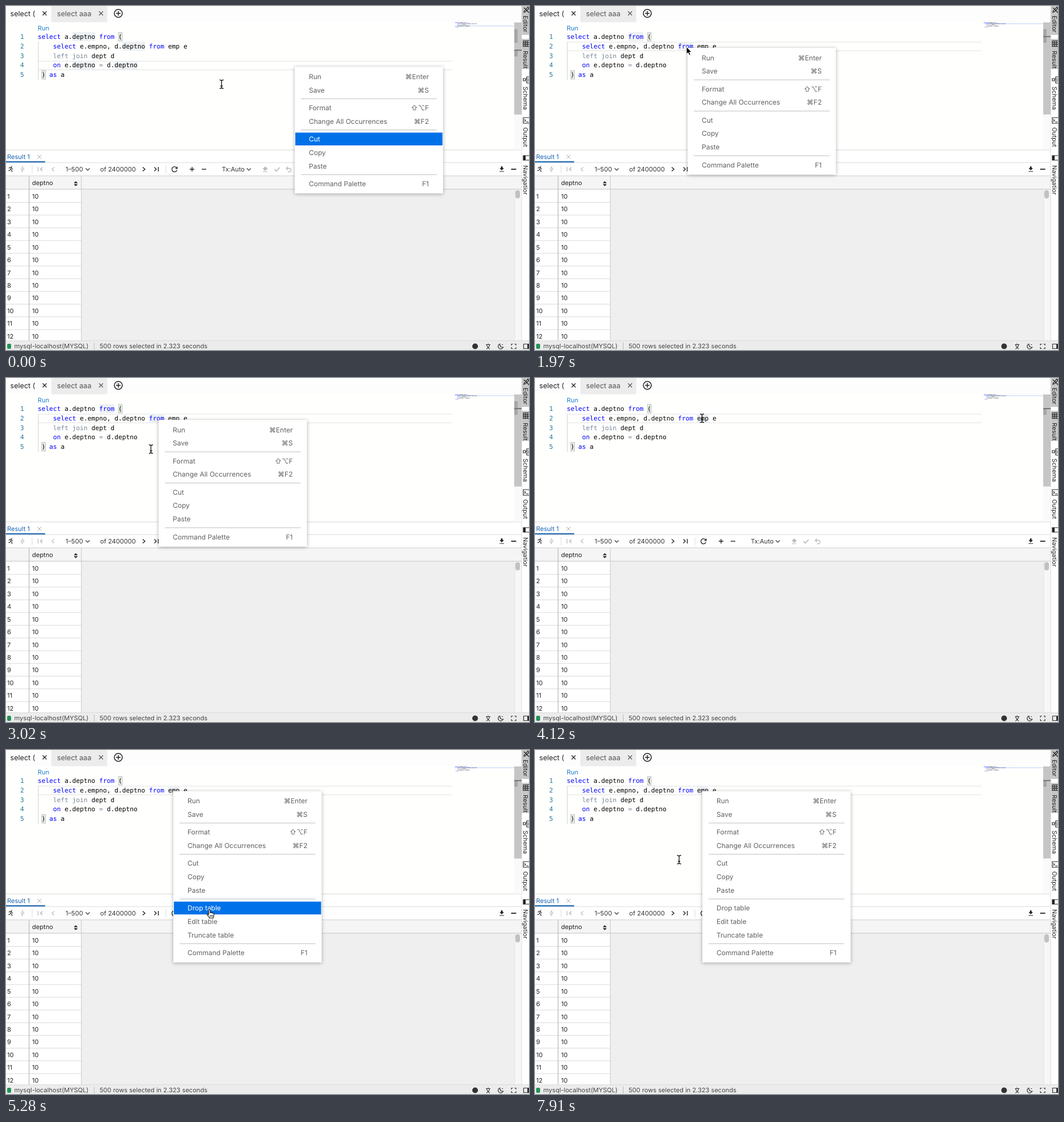
An HTML page that plays this animation: 922x607 px, repeating every 8000 ms.

```html
<!DOCTYPE html>
<html lang="en">
<head>
<meta charset="utf-8">
<title>SQL editor context menu</title>
<style>
html, body { margin: 0; width: 100%; height: 100%; overflow: hidden; background: #fff; }
svg { display: block; width: 922px; height: 607px; }
text { font-family: Inter, 'DejaVu Sans', sans-serif; font-size: 11.1px; fill: #333; white-space: pre; text-rendering: geometricPrecision; }
.code { font-family: 'DejaVu Sans Mono', monospace; font-size: 11.23px; }
.menu text { font-size: 12px; }
.panel { filter: drop-shadow(0 1px 3px rgba(0,0,0,.32)); }
</style>
</head>
<body>
<svg viewBox="0 0 922 607">
  <g id="back"></g><g id="marks"></g><g id="code"></g><g id="menu" class="menu"></g><g id="pointer"></g>
</svg>
<script>
const $ = id => document.getElementById(id);
const rect = (x, y, w, h, fill, extra = '') => `<rect x="${x}" y="${y}" width="${w}" height="${h}" fill="${fill}" ${extra}/>`;
const text = (x, y, s, fill = '#333', extra = '') => `<text x="${x}" y="${y}" style="fill:${fill}" ${extra}>${s}</text>`;
const icon = (x, y, d, color = '#333', width = 1.2, fill = 'none') =>
  `<path transform="translate(${x} ${y})" d="${d}" fill="${fill}" stroke="${color}" stroke-width="${width}"/>`;

const CROSS = 'M-3.5-3.5L3.5 3.5M3.5-3.5L-3.5 3.5';
const DOWN = 'M-3.5-1.5L0 2L3.5-1.5';
const CHAR = 6.76, LINE = 16.8, BLUE = '#0000ff', SLATE = '#778899';
const col = c => 56 + c * CHAR;
const lineTop = n => 46.2 + (n - 1) * LINE;

// line, column, text, colour
const TOKENS = [
  [1, 0, 'select', BLUE], [1, 7, 'a.deptno', '#000'], [1, 16, 'from', BLUE], [1, 21, '(', '#000'],
  [2, 4, 'select', BLUE], [2, 11, 'e.empno,', '#000'], [2, 20, 'd.deptno', '#000'], [2, 29, 'from', BLUE],
  [2, 34, 'emp', '#000'], [2, 38, 'e', '#000'],
  [3, 4, 'left', SLATE], [3, 9, 'join', SLATE], [3, 14, 'dept', '#000'], [3, 19, 'd', '#000'],
  [4, 4, 'on', BLUE], [4, 7, 'e.deptno', '#000'], [4, 16, '=', SLATE], [4, 18, 'd.deptno', '#000'],
  [5, 1, ')', '#000'], [5, 3, 'as', BLUE], [5, 6, 'a', '#000']
];

function tabs() {
  return rect(0, 0, 909, 28.5, '#fdfdfd') + rect(80, 0, 98.5, 28.5, '#ececec') +
    text(7.5, 17.5, 'select (', '#222', 'font-size="12.6" class="tab"') + text(90, 17.5, 'select aaa', '#555', 'class="tab"') +
    icon(68, 13, CROSS, '#222', 1.3) + icon(167.5, 13, CROSS, '#555') +
    icon(198, 13, 'M-7 0A7 7 0 1 1 7 0A7 7 0 1 1-7 0M-4 0H4M0-4V4', '#222', 1.5);
}

function resultBar() {
  const pale = '#bbb';
  const bars = [45.5, 281.5].map(x => rect(x, 281, 1, 14, '#ddd')).join('');
  return rect(0, 253.5, 909, 1, '#d6d6d6') + rect(0, 275.8, 909, 1, '#ddd') +
    text(2, 270, 'Result 1', '#1762b0') + icon(59, 266, CROSS, '#aaa', 1) + rect(0, 274, 69, 2, '#1762b0') + bars +
    icon(8, 288, 'M1.5-5.2H3M-3-1.5L-1-3.5H1.5L0 0L2.5 2V5M0 0L-1.5 2.5H-4M1.5-2.5L4-.5') +
    icon(29, 288, 'M1-5L-3 1H0L-1 5L3-1H0Z', pale, 1) +
    icon(60.5, 288, 'M-4-4V4M3.5-3.5L0 0L3.5 3.5M0 0H4', pale) + icon(83, 288, 'M2-3.5L-2 0L2 3.5', pale) +
    text(105, 292.3, '1–500') + icon(144, 288, DOWN) + text(166, 292, 'of 2400000') +
    icon(243, 288, 'M-2-3.5L2 0L-2 3.5', '#222', 1.4) + icon(265, 288, 'M-3.5-3.5L0 0L-3.5 3.5M3.5-4V4', '#222', 1.4) +
    icon(297, 288, 'M4.2-1.5A4.5 4.5 0 1 0 4.3 1.5M4.8-4.5V-1.2H1.5', '#222', 1.3) +
    icon(328, 288, 'M-4 0H4M0-4V4', '#222', 1.4) + icon(349, 288, 'M-4 0H4', '#222', 1.4) +
    text(380.5, 292.3, 'Tx:Auto') + icon(428, 288, DOWN) +
    icon(457, 288, 'M0-4.5L4-.5H1.5V2H-1.5V-.5H-4ZM-4 4.5H4', pale, 1, pale) +
    icon(478, 288, 'M-4.5 0L-1.5 3.5L4.5-3', pale, 1.8) + icon(498, 288, 'M-1-4.5L-4-1.5L-1 1.5M-4-1.5H1.5A3 3 0 0 1 1.5 4.5H-1', pale, 1.3) +
    icon(874, 287.5, 'M-1-4H1V-1H3L0 2L-3-1H-1ZM-4 4.5H4', '#222', 1, '#222') + icon(895, 288, 'M-4.5 0H4.5', '#222', 1.8);
}

function grid() {
  let out = rect(0, 299.5, 909, 291.5, '#efefef') + rect(0, 300, 909, 23, '#f5f5f5') + rect(0, 299.2, 909, 1, '#d2d2d2') +
    rect(0, 324, 133, 267, '#fff') + rect(0, 322.7, 909, 1, '#c6c6c6') +
    text(46, 316, 'deptno', '#222') + icon(123, 313.5, 'M-3-1.2H3L0-4ZM-3 1.2H3L0 4Z', '#222', .6, '#222');
  for (let i = 0; i < 12; i++) {
    const y = 324 + i * 22.45;
    out += text(2, y + 15.8, i + 1, '#222') + text(46, y + 15.8, '10', '#222') + rect(0, y + 22, 133, 1, '#dadada');
  }
  return out + rect(40, 300, 1.3, 291, '#bdbdbd') + rect(132.3, 300, 1, 291, '#c8c8c8') +
    rect(896.5, 324, 1, 267, '#e2e2e2') + rect(897.5, 324, 11.5, 267, '#f7f7f7') + rect(898, 325, 8, 14.5, '#c1c1c1', 'rx="4"');
}

function sidebar() {
  const names = [['Editor', 17], ['Result', 79], ['Schema', 142], ['Output', 214], ['Navigation', 281]];
  return rect(909, 0, 13, 591, '#fff') + rect(909, 0, 13, 51, '#c6c6c6') + rect(909, 58, 13, 53, '#c6c6c6') +
    rect(908.6, 0, 1, 591, '#ddd') +
    names.map(([s, y]) => text(0, 0, s, '#222', `transform="translate(912.3 ${y}) rotate(90)" class="side"`)).join('') +
    rect(910, 333, 12, 10, '#fff') +
    icon(917, 7, 'M-4 4L-3 1L3-5L5-3L-1 3ZM-4-4L5 5', '#222', 1.3) +
    icon(917, 66.5, 'M-5-5H6V5H-5ZM-5-1.7H6M-5 1.7H6M-1.5-5V5M2-5V5', '#222', 1.2) +
    icon(917, 130, 'M-5-2H-1V2H-5ZM1-5H6V-1H1ZM1 2H6V6H1ZM-1 0H1', '#222', 1.2) +
    icon(917, 202, 'M-5-5H6V5H-5ZM-3-2L-1 0L-3 2M0 2.5H4', '#222', 1.2) +
    icon(917, 268, 'M-5-4H6V4H-5Z', '#222', 1.2) + rect(912, 264, 4, 8, '#222');
}

function statusBar() {
  return rect(0, 590.5, 922, 16.5, '#ececec') + rect(0, 590, 922, 1, '#dcdcdc') +
    rect(2, 596, 7, 9, '#22935a', 'rx="2"') +
    text(14.5, 604.3, 'mysql-localhost(MYSQL)', '#444') + rect(155, 594, 1, 12, '#bbb') +
    text(165, 604.3, '500 rows selected in 2.323 seconds', '#444') +
    '<circle cx="827" cy="600.5" r="5" fill="#333"/>' +
    icon(850, 600.5, 'M-4-3H4M0-5V-3M-3 4.5Q2 2 2.5-3M3 4.5Q-2 2-2.5-3') +
    icon(872, 600.5, 'M-1-4.5A4.6 4.6 0 1 0 4.5 1.5A4.5 4.5 0 0 1-1-4.5M2-3H4') +
    icon(895, 600.5, 'M-4-1.5V-4H-1.5M1.5-4H4V-1.5M4 1.5V4H1.5M-1.5 4H-4V1.5') +
    icon(917, 600.5, 'M-4.5-4H5V4H-4.5Z') + rect(919, 596.5, 3, 8, '#333');
}

function codeLayer() {
  let out = text(56, 42.8, 'Run', '#1a7fd0') + rect(56.5, 63, 1, 67, '#d0d0d0');
  for (const [n, c] of [[1, 21], [5, 1]])
    out += rect(col(c) + .3, lineTop(n) + .4, 6.6, 15.2, '#e7f0e4', 'stroke="#b9b9b9" stroke-width=".9"');
  for (let n = 1; n <= 5; n++) out += text(25, lineTop(n) + 11.8, n, '#237893', 'class="code"');
  for (const [n, c, s, fill] of TOKENS)
    out += text(col(c), lineTop(n) + 11.8, s, fill, 'class="code"') +
      rect(791.5 + c, 28.8 + n * 2 - 2, s.length, 1.1, fill, 'opacity=".45"');
  return out;
}

function marksLayer(line, word) {
  const y = lineTop(line), rulerY = n => 41 + (n - 1) * 12;
  let out = rect(57, y + .2, 730, 1.2, '#e6e6e6') + rect(57, y + LINE - 1.4, 730, 1.2, '#e6e6e6') +
    rect(791, 28.2 + (line - 1) * 2, 105, 2, '#d9e6fb') +
    rect(896, 29, 13, 224.5, '#fafafa') + rect(896, 29, 13, 162.5, '#c5c5c5');
  for (const [n, c, s] of TOKENS) {
    const at = s.split('.').pop() === word ? s.length - word.length : -1;
    if (at >= 0)
      out += rect(col(c + at), lineTop(n), word.length * CHAR, LINE - 1, '#edf1f4') + rect(896, rulerY(n), 6, 12, '#a6a6a6');
  }
  return out + rect(896, rulerY(line), 13, 2, '#777');
}

const ROW = 23.75, GAP = 7.6, PAD = 5.3, MENU_W = 261.5;
const EDIT_ITEMS = [['Run', '⌘Enter'], ['Save', '⌘S'], 0, ['Format', '⇧⌥F'], ['Change All Occurrences', '⌘F2'], 0, ['Cut'], ['Copy'], ['Paste'], 0];
const TABLE_ITEMS = [['Drop table'], ['Edit table'], ['Truncate table'], 0];
const PALETTE = [['Command Palette', 'F1']];

function makeMenu(from, to, x, y, items) {
  let top = y + PAD;
  const rows = items.map(item => {
    const row = { item, top, height: item ? ROW : GAP };
    top += row.height;
    return row;
  });
  return { from, to, x, y, rows, bottom: top + PAD };
}
const MENUS = [
  makeMenu(0, 180, 509, 107.3, [...EDIT_ITEMS, ...PALETTE]),
  makeMenu(1880, 3200, 269, 74, [...EDIT_ITEMS, ...PALETTE]),
  makeMenu(4300, 8000, 295, 72.6, [...EDIT_ITEMS, ...TABLE_ITEMS, ...PALETTE])
];

function menuLayer(menu, active) {
  if (!menu) return '';
  const { x, y, rows, bottom } = menu;
  let out = rect(x, y, MENU_W, bottom - y, '#fff', 'class="panel"');
  for (const row of rows) {
    if (!row.item) { out += rect(x + 11, row.top + 2.9, 239.5, 1.2, '#c9c9c9'); continue; }
    const fill = row === active ? '#fff' : '#616161', base = row.top + 16.2;
    if (row === active) out += rect(x + 1, row.top + .6, MENU_W - 2, 22.6, '#0071e8');
    out += text(x + 25, base, row.item[0], fill) + text(x + 236.5, base, row.item[1] || '', fill, 'text-anchor="end"');
  }
  return out;
}

// start, end, steps, destination x, y
const MOVES = [
  [90, 830, 9, 225, 75], [920, 1180, 4, 232, 104], [1270, 1530, 4, 267, 72],
  [2090, 2360, 4, 320, 272], [2450, 2630, 3, 304, 175], [2720, 3020, 4, 255.5, 125.5],
  [3300, 3680, 5, 294.5, 71], [4470, 5190, 9, 352, 250], [5280, 5280, 1, 358.5, 281.5],
  [5370, 5370, 1, 361, 284], [5700, 5790, 2, 367, 306], [5990, 6170, 3, 374, 287.5], [7550, 7910, 5, 254, 193.5]
];
// start, current line, highlighted word
const CARETS = [[0, 4, 'deptno'], [1710, 2, ''], [1880, 2, 'from'], [3290, 5, ''], [3860, 2, ''], [4120, 2, 'emp']];

function pointerAt(t) {
  let x = 380, y = 138;
  for (const [start, end, steps, tx, ty] of MOVES) {
    if (t < start) break;
    const interval = steps > 1 ? (end - start) / (steps - 1) : 1;
    const p = Math.min(1, (Math.floor((t - start) / interval + 1e-6) + 1) / steps);
    x += (tx - x) * p;
    y += (ty - y) * p;
  }
  return [x, y];
}

const POINTERS = {
  beam: ['M-3.5-7.5Q0-7.5 0-5.5Q0-7.5 3.5-7.5M0-5.5V5.5M-3.5 7.5Q0 7.5 0 5.5Q0 7.5 3.5 7.5M-2 3H2', '#111', 1.3, 'none'],
  arrow: ['M0 0V13L3 10.3L5 15L7.2 14L5.2 9.5H9Z', '#fff', .9, '#000'],
  hand: ['M-1.3 9V1Q0-1 1.3 1V5.8Q2.6 4.6 3.8 6Q5 5.1 6.2 6.5Q8 6 8 7.8V10.2Q8 12 6.8 13.2V15H-.2V13.5L-4 9.2Q-4.2 7-2.6 7.6ZM1.5 10V12.5M3.5 10V12.5M5.5 10V12.5', '#111', 1.1, '#fff']
};

const drawn = {};
function update(id, key, render) {
  if (drawn[id] === key) return;
  drawn[id] = key;
  $(id).innerHTML = render();
}

function frame() {
  const t = performance.now() % 8000;
  const [x, y] = pointerAt(t);
  const menu = MENUS.find(m => t >= m.from && t < m.to);
  const within = menu && x > menu.x - 3 && x < menu.x + MENU_W && y > menu.y - 3 && y < menu.bottom;
  const hovered = within && menu.rows.find(r => r.item && y >= r.top && y < r.top + r.height);
  const active = t < 90 ? menu.rows.find(r => r.item && r.item[0] === 'Cut') : hovered;
  const shape = hovered ? 'hand' : within ? 'arrow' : 'beam';
  const [, line, word] = CARETS.filter(c => t >= c[0]).pop();
  update('marks', line + word, () => marksLayer(line, word));
  update('menu', menu ? menu.from + ':' + (active ? active.item[0] : '') : '', () => menuLayer(menu, active));
  update('pointer', [x, y, shape].join(), () => icon(x, y, ...POINTERS[shape]));
  requestAnimationFrame(frame);
}

$('back').innerHTML = rect(0, 28.5, 909, 225, '#fffffe') + tabs() + resultBar() + grid() + sidebar() + statusBar();
$('code').innerHTML = codeLayer();
document.querySelectorAll('.tab').forEach(e => e.style.fontSize = '12.6px');
document.querySelectorAll('.side').forEach(e => e.style.fontSize = '10.8px');
frame();
</script>
</body>
</html>
```
